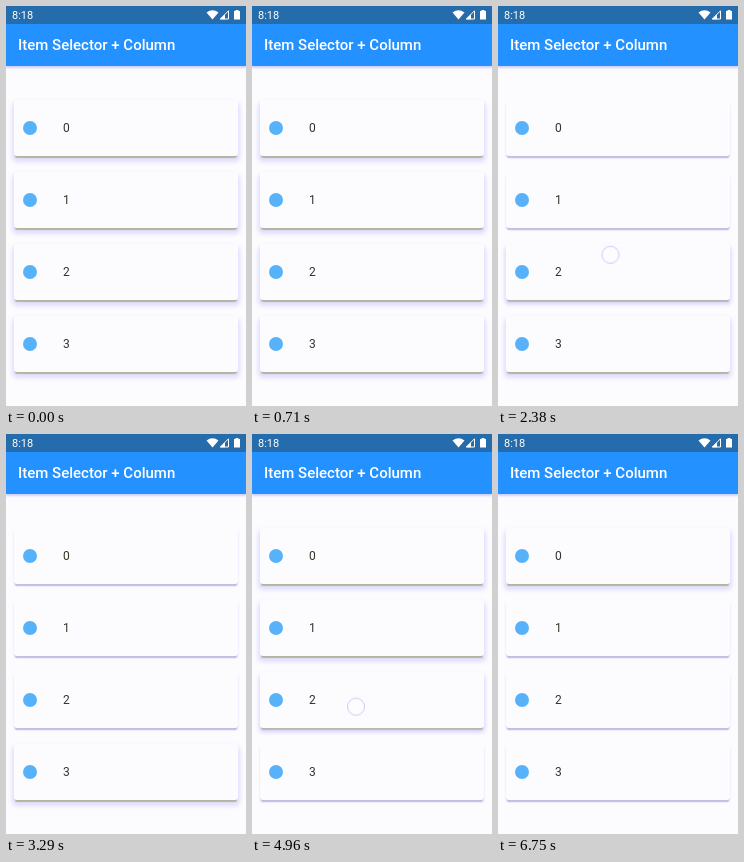
An HTML page that plays this animation: 240x400 px, repeating every 6790 ms.

```html
<!DOCTYPE html>
<html lang="en">
<head>
<meta charset="utf-8">
<title>Item Selector</title>
<style>
  :root {
    --high: 0 3px 1px -1px rgba(168, 165, 125, .75), 0 4px 4px 2px rgba(220, 218, 255, .9);
    --low: 0 3px 1px -1px rgba(165, 165, 190, .5), 0 2px 2px 0 rgba(205, 202, 255, .75);
    --loop: 6790ms linear infinite;
  }
  html, body {
    margin: 0;
    width: 100%;
    height: 100%;
    overflow: hidden;
    background: #fcfcfe;
    font-family: Roboto, sans-serif;
  }
  .stage { position: relative; width: 240px; height: 400px; overflow: hidden; background: #fcfcfe; }
  .status { position: absolute; inset: 0 0 auto; height: 18px; background: #246cab; color: #fff; }
  .status span { position: absolute; left: 6px; top: 3px; font-size: 11px; line-height: 13px; }
  .status svg { position: absolute; left: 200px; top: 0; }
  .bar {
    position: absolute;
    top: 18px;
    width: 240px;
    height: 42px;
    box-sizing: border-box;
    padding-left: 12px;
    background: #2391ff;
    color: #fff;
    font-size: 15px;
    font-weight: 500;
    line-height: 43px;
    white-space: nowrap;
    box-shadow: 0 2px 2px rgba(200, 200, 250, .85);
  }
  .card {
    position: absolute;
    left: 8px;
    top: calc(94px + 72px * var(--i));
    width: 224px;
    height: 56px;
    border-radius: 3px;
    background: #fcfcfe;
    color: #333328;
    font-size: 12px;
    line-height: 56px;
    text-indent: 49px;
    box-shadow: var(--high);
  }
  .card::before {
    content: "";
    position: absolute;
    left: 9px;
    top: 21px;
    width: 14px;
    height: 14px;
    border-radius: 50%;
    background: #58b2fa;
  }
  .c0 { --i: 0; animation: c0 var(--loop); }
  .c1 { --i: 1; animation: c1 var(--loop); }
  .c2 { --i: 2; animation: c2 var(--loop); }
  .c3 { --i: 3; animation: c3 var(--loop); }

  /* selected cards sink, a new selection lifts the old one */
  @keyframes c0 {
    0%, 23.86% { box-shadow: var(--high); }
    27.1%, 61.12% { box-shadow: var(--low); }
    64.8%, 100% { box-shadow: var(--high); }
  }
  @keyframes c1 {
    0%, 31.08% { box-shadow: var(--high); }
    34.32%, 61.12% { box-shadow: var(--low); }
    64.8%, 75.55% { box-shadow: var(--high); }
    79.09%, 100% { box-shadow: var(--low); }
  }
  @keyframes c2 {
    0%, 34.32% { box-shadow: var(--high); }
    37.41%, 61.12% { box-shadow: var(--low); }
    64.8%, 72.16% { box-shadow: var(--high); }
    75.41%, 100% { box-shadow: var(--low); }
  }
  @keyframes c3 {
    0%, 61.12% { box-shadow: var(--high); }
    64.8%, 100% { box-shadow: var(--low); }
  }

  .touch {
    position: absolute;
    left: -9px;
    top: -9px;
    width: 18px;
    height: 18px;
    box-sizing: border-box;
    border: 1px solid #cbc6fb;
    border-radius: 50%;
    background: rgba(253, 253, 255, .7);
    animation: drag var(--loop), press var(--loop);
  }
  @keyframes drag {
    0%, 27.69% { transform: translate(116px, 130px); animation-timing-function: ease-in-out; }
    37.41%, 50% { transform: translate(112px, 265px); animation-timing-function: step-end; }
    50.01%, 68.78% { transform: translate(102px, 358px); animation-timing-function: ease-in; }
    73.05% { transform: translate(104px, 273px); animation-timing-function: ease-out; }
    78.65%, 100% { transform: translate(116px, 195px); }
  }
  @keyframes press {
    0%, 18.41% { opacity: 0; }
    19.73%, 40.5% { opacity: 1; }
    40.51%, 55.23% { opacity: 0; }
    55.8%, 82.33% { opacity: 1; }
    82.34%, 100% { opacity: 0; }
  }
</style>
</head>
<body>
<div class="stage">
  <div class="bar">Item Selector + Column</div>
  <div class="status">
    <span>8:18</span>
    <svg width="40" height="18" fill="#fff">
      <path d="M.5 6.5Q6.5 2 12.5 6.5L6.5 13.5Z"/>
      <path d="M14.3 13L22.5 4.8V13Z" fill="none" stroke="#fff"/>
      <path d="M14 13.3L19 8.3V13.3Z"/>
      <path d="M28 5h1.5v-1h3v1h1.5v8.500h-6z"/>
    </svg>
  </div>
  <div class="card c0">0</div>
  <div class="card c1">1</div>
  <div class="card c2">2</div>
  <div class="card c3">3</div>
  <div class="touch"></div>
</div>
</body>
</html>
```
